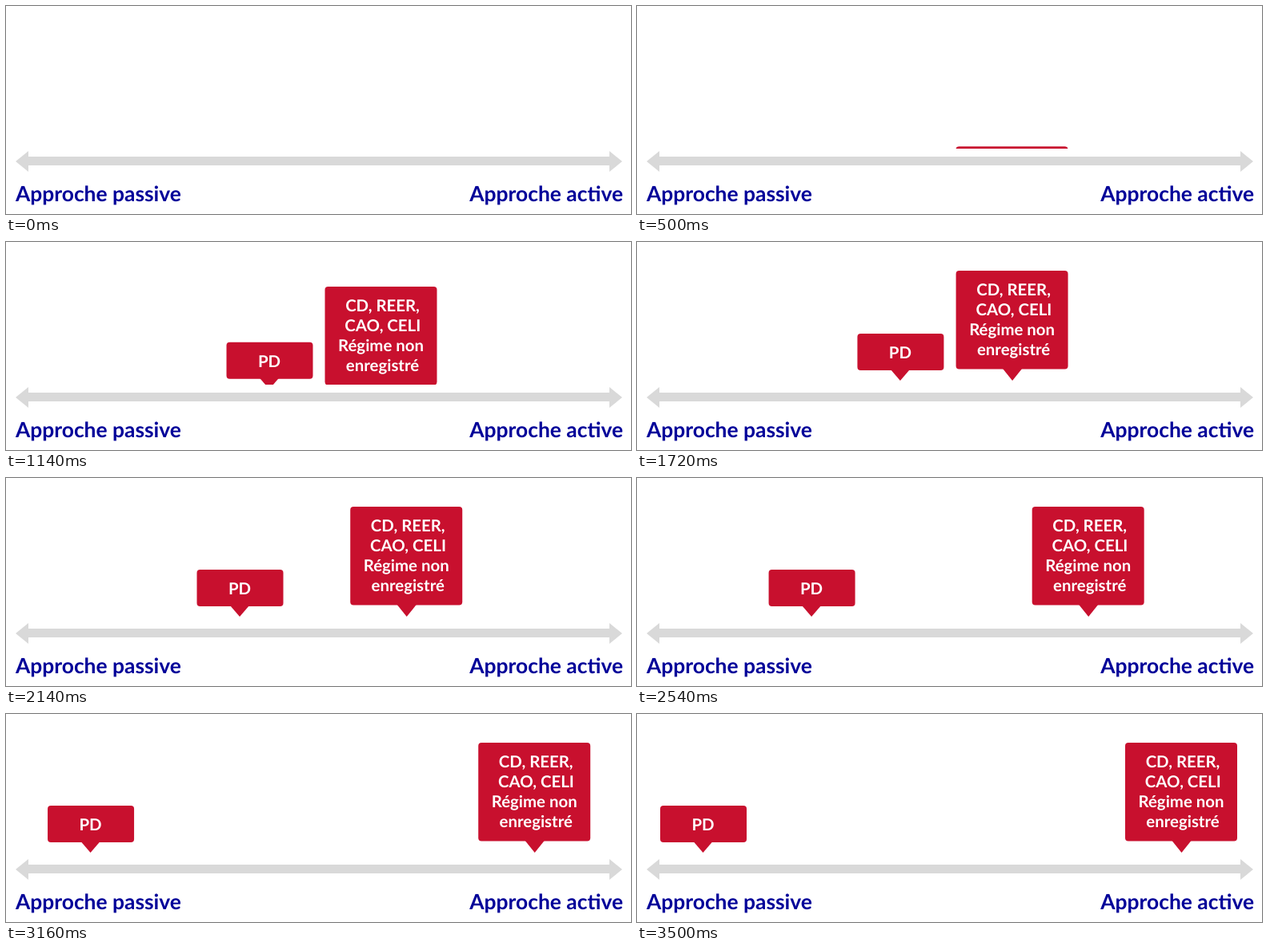
Animation, 781 px wide and 261 px high, one loop 3.6 s. Source, as an HTML page:

```html
<!DOCTYPE html>
<html lang="fr">
<head>
<meta charset="utf-8">
<title>Approche passive, approche active</title>
<style>
  html, body { margin: 0; width: 100%; height: 100%; overflow: hidden; background: #fff; }
  svg { display: block; width: 781px; height: 261px; }
  text { font-family: Lato, "Open Sans", sans-serif; font-weight: 700; text-rendering: geometricPrecision; }
  .label { font-size: 26.4px; fill: #000099; }
  .card { fill: #c8102e; }
  .card text { font-size: 20.4px; fill: #fff; text-anchor: middle; }
</style>
</head>
<body>
<svg viewBox="0 0 781 261">
  <defs>
    <clipPath id="floor"><rect width="781" height="179"/></clipPath>
  </defs>
  <path fill="#d9d9d9" d="M12 195 28 182V189H754V182L770 195 754 208V200H28V208Z"/>
  <text class="label" x="12" y="245">Approche passive</text>
  <text class="label" x="771" y="245" text-anchor="end">Approche active</text>
  <g clip-path="url(#floor)">
    <g class="card" id="left">
      <rect y="115" width="108" height="46" rx="4"/>
      <path d="M41.5 160H65.5L53.5 174Z"/>
      <text x="53.5" y="146">PD</text>
    </g>
    <g class="card" id="right">
      <rect y="36" width="140" height="123.5" rx="4"/>
      <path d="M58.5 159H82.5L70.5 174Z"/>
      <text x="72" y="67">CD, REER,</text>
      <text x="72.3" y="92">CAO, CELI</text>
      <text x="70" y="117">Régime non</text>
      <text x="72" y="142">enregistré</text>
    </g>
  </g>
</svg>
<script>
  const LOOP = 3600, STEP = 20;
  const cards = [
    { el: document.getElementById("left"), from: 275.5, to: 29, drop: 77 },
    { el: document.getElementById("right"), from: 398.5, to: 610, drop: 144 }
  ];

  const progress = (t, start, end) => Math.min(1, Math.max(0, (t - start) / (end - start)));

  // Cubic ease with chosen speeds at both ends
  const ease = (u, v0 = 0, v1 = 0) =>
    u * (1 - u) * (1 - u) * v0 + u * u * (3 - 2 * u) - u * u * (1 - u) * v1;

  function draw(time) {
    const t = Math.floor((time % LOOP) / STEP) * STEP;
    const rise = ease(progress(t, 470, 1300), 0.7, 0.5);
    const slide = ease(progress(t, 1700, 3500));
    for (const { el, from, to, drop } of cards) {
      const x = from + (to - from) * slide;
      const y = drop * (1 - rise);
      el.setAttribute("transform", `translate(${x.toFixed(2)} ${y.toFixed(2)})`);
    }
  }

  let begin;
  function tick(now) {
    begin ??= now;
    draw(now - begin);
    requestAnimationFrame(tick);
  }
  draw(0);
  requestAnimationFrame(tick);
</script>
</body>
</html>
```
